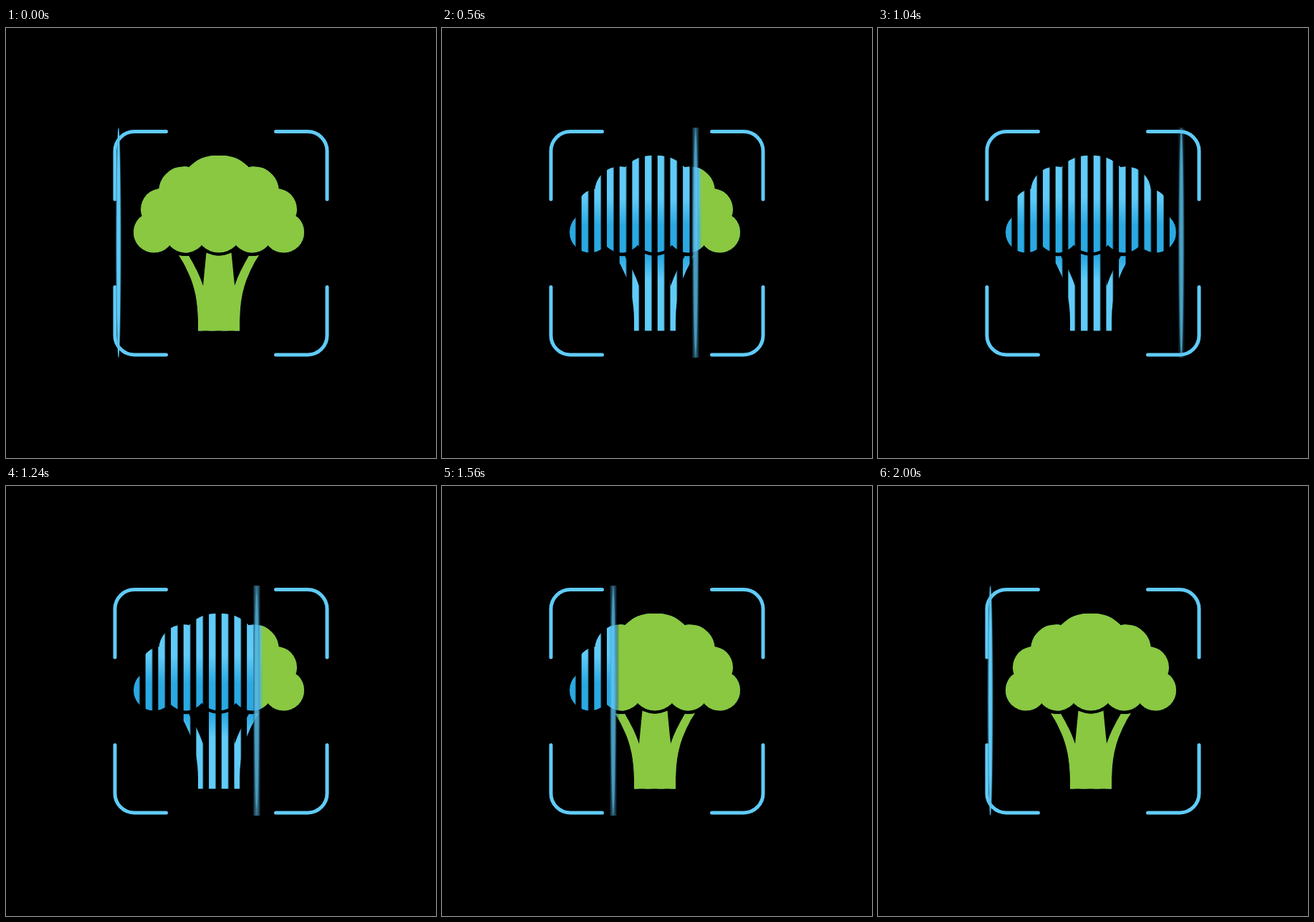
Recreate the animation shown at these times as an HTML page without scripts. Size 600x600 px, loop 2040 ms.

```html
<!DOCTYPE html>
<html lang="en">
<head>
<meta charset="utf-8">
<title>Broccoli scan</title>
<style>
  html, body { margin: 0; width: 100%; height: 100%; overflow: hidden; background: #000; }
  svg { display: block; width: 100vw; height: 100vh; }
  .sweep { animation: sweep 2040ms cubic-bezier(.167, .167, .667, 1) infinite; }
  .smear { animation: smear 2040ms linear infinite; }
  .core { animation: core 2040ms linear infinite; }

  /* 1 s out, 1 s back, one short rest */
  @keyframes sweep {
    0% { transform: translateX(156.7px); }
    49.0196% { transform: translateX(436px); }
    98.0392%, 100% { transform: translateX(156.7px); }
  }
  @keyframes smear {
    0%, 49.02%, 98.04%, 100% { opacity: 0; }
    5%, 12%, 54%, 61% { opacity: 1; }
    27.5%, 76.5% { opacity: .8; }
    41%, 90% { opacity: .15; }
  }
  @keyframes core {
    0%, 49.02%, 98.04%, 100% { opacity: 1; }
    5%, 12%, 54%, 61% { opacity: .3; }
    27.5%, 76.5% { opacity: .5; }
    41%, 90% { opacity: .9; }
  }
</style>
</head>
<body>
<svg viewBox="0 0 600 600">
  <defs>
    <g id="lobes">
      <circle cx="206.5" cy="285" r="28.5"/>
      <circle cx="217" cy="253" r="29"/>
      <circle cx="248" cy="228" r="34.8"/>
      <circle cx="250.5" cy="284" r="29.5"/>
      <circle cx="292" cy="227" r="49"/>
    </g>
    <g id="plant">
      <use href="#lobes"/>
      <use href="#lobes" transform="matrix(-1 0 0 1 594 0)"/>
      <circle cx="297" cy="281.5" r="32"/>
      <path d="M228 225H366V300H228ZM290 178H304V230H290Z"/>
      <path d="M241 317Q248 319 255 318Q267 337 275 360L279.5 313.5Q297 322 314.500 313.500L319 360Q327 337 339 318Q346 319 353 317Q326 357 326 408V422.500H268V408Q268 357 241 317Z"/>
    </g>
    <path id="corner" d="M152 239V171.500A27 27 0 0 1 179 144.500H223.500"/>

    <linearGradient id="tint" gradientUnits="userSpaceOnUse" x1="0" y1="178" x2="0" y2="422">
      <stop offset=".24" stop-color="#60cbf8"/>
      <stop offset=".4" stop-color="#2aa9e2"/>
      <stop offset=".58" stop-color="#2aa9e2"/>
      <stop offset=".71" stop-color="#60cbf8"/>
    </linearGradient>
    <linearGradient id="edge">
      <stop offset="0" stop-color="#000"/>
      <stop offset="1" stop-color="#fff"/>
    </linearGradient>
    <linearGradient id="soft">
      <stop offset="0" stop-color="#55b9e6" stop-opacity="0"/>
      <stop offset=".3" stop-color="#55b9e6" stop-opacity=".7"/>
      <stop offset=".7" stop-color="#55b9e6" stop-opacity=".7"/>
      <stop offset="1" stop-color="#55b9e6" stop-opacity="0"/>
    </linearGradient>
    <pattern id="bars" patternUnits="userSpaceOnUse" x="177" y="0" width="17.680" height="600">
      <rect width="9.400" height="600" fill="#fff"/>
    </pattern>

    <mask id="striped" maskUnits="userSpaceOnUse" x="0" y="0" width="600" height="600">
      <rect width="600" height="600" fill="url(#bars)"/>
    </mask>
    <mask id="unscanned" maskUnits="userSpaceOnUse" x="0" y="0" width="600" height="600">
      <g class="sweep">
        <rect x="2" width="6" height="600" fill="url(#edge)"/>
        <rect x="8" width="600" height="600" fill="#fff"/>
      </g>
    </mask>
    <mask id="inside" maskUnits="userSpaceOnUse" x="0" y="0" width="600" height="600">
      <use href="#plant" fill="#fff"/>
    </mask>
  </defs>

  <rect width="600" height="600"/>

  <g mask="url(#striped)"><use href="#plant" fill="url(#tint)"/></g>
  <g mask="url(#unscanned)"><use href="#plant" fill="#89c840"/></g>
  <g mask="url(#inside)">
    <g class="sweep"><rect x="-6" y="170" width="14" height="260" fill="url(#soft)"/></g>
  </g>

  <g fill="none" stroke="#60cbf8" stroke-width="5" stroke-linecap="round">
    <use href="#corner"/>
    <use href="#corner" transform="matrix(-1 0 0 1 600 0)"/>
    <use href="#corner" transform="matrix(1 0 0 -1 0 600.500)"/>
    <use href="#corner" transform="matrix(-1 0 0 -1 600 600.500)"/>
  </g>

  <g class="sweep">
    <g class="smear">
      <rect x="-5.500" y="139" width="11" height="321" fill="url(#soft)" opacity=".75"/>
      <ellipse cy="299.500" rx="3.500" ry="150" fill="#5cc6f2" opacity=".4"/>
    </g>
    <g class="core">
      <ellipse cy="299.500" rx="3.900" ry="160.500" fill="#3797bd" opacity=".6"/>
      <ellipse cy="299.500" rx="2.600" ry="160.500" fill="#60cbf8"/>
    </g>
  </g>
</svg>
</body>
</html>
```
